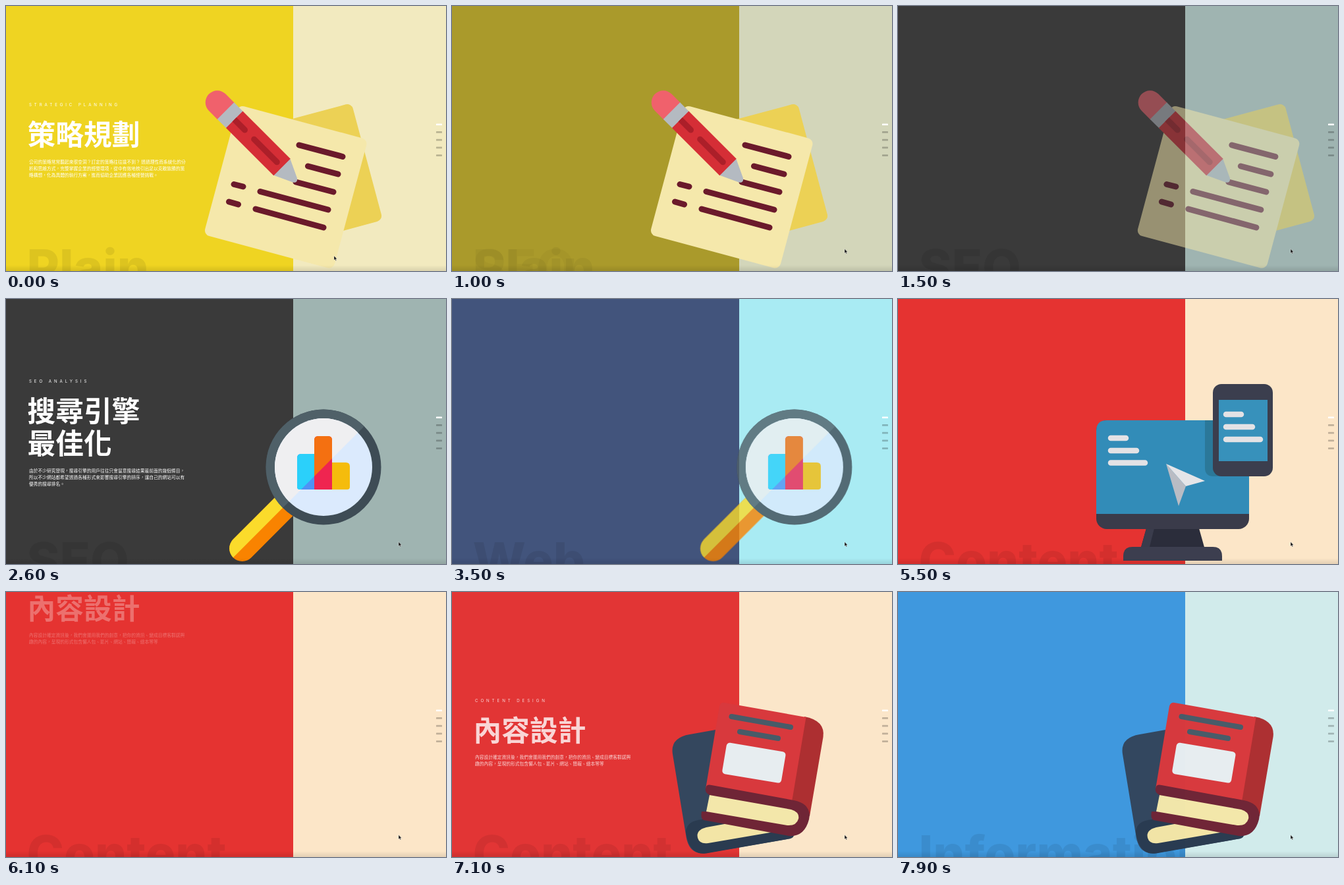
These frames come from a looping animation (668x402 px, 8 s). An HTML page:

```html
<!DOCTYPE html>
<html lang="zh-Hant">
<head>
<meta charset="utf-8">
<title>Service slides</title>
<style>
html, body { margin: 0; width: 100%; height: 100%; overflow: hidden; }
svg { display: block; width: 100vw; height: 100vh; }
.word { font: 800 76px Inter, "Open Sans", sans-serif; fill: #000; fill-opacity: .075; }
.copy { fill: #fff; font-family: "Noto Sans CJK TC", "Noto Sans CJK", "Noto Sans CJK SC", "Noto Sans CJK JP", sans-serif; }
.tag { font: 400 6.2px Inter, sans-serif; letter-spacing: 3.9px; }
.title { font-size: 42.7px; font-weight: 700; }
.body { font-size: 6.75px; }
.round { stroke-linecap: round; fill: none; }
</style>
</head>
<body>
<svg viewBox="0 0 668 402" preserveAspectRatio="none">
  <defs>
    <linearGradient id="shade" x2="0" y2="1">
      <stop stop-opacity="0"/><stop offset="1" stop-opacity=".1"/>
    </linearGradient>
    <clipPath id="upper"><path d="M337 400V100H637Z"/></clipPath>
    <path id="low" d="M468 235H448Q442 235 442 241V285Q442 289 446 289H468Z"/>
    <path id="tall" d="M468 289V214Q468 208 474 208H489Q495 208 495 214V289Z"/>
  </defs>
  <rect id="left" width="668" height="402"/>
  <g id="words"></g>
  <rect id="right" x="436" width="232" height="402"/>
  <g id="copies"></g>

  <g id="arts">
    <!-- notes and pencil -->
    <g>
      <rect x="-150" width="150" height="184" rx="9" fill="#ecd155" transform="translate(524.5 147) rotate(-15)"/>
      <rect width="203.7" height="203.7" rx="9" fill="#f5e8ab" transform="translate(352.7 150) rotate(15)"/>
      <path class="round" stroke="#6b1a2b" stroke-width="9" d="M445 211L511 228.5M458.5 243L504 255M440 267L497 282M386 281.5L489 309M379 308L482 336M346 270.5L360 274M338.5 297L352.5 301"/>
      <g transform="translate(333.5 159) rotate(45)">
        <path fill="#f0616c" d="M1 -18H-18A18 18 0 0 0 -18 18H1Z"/>
        <path fill="#b4bac1" d="M0 -18H20V18H0ZM120 -18L149 -4.5Q155 0 149 4.5L120 18Z"/>
        <path fill="#d52e36" d="M18.7 -18H121V18H18.7Z"/>
        <path fill="#ac1f29" d="M18.7 -4.5H41A4.5 4.5 0 0 1 41 4.5H18.7Z"/>
        <path class="round" stroke="#ac1f29" stroke-width="9" d="M61 0H110"/>
      </g>
    </g>
    <!-- magnifier -->
    <g>
      <g transform="translate(482 255) rotate(135)">
        <path fill="#f98300" d="M80 -19.5H174.5A19.5 19.5 0 0 1 174.5 19.5H80Z"/>
        <path fill="#fbdb2b" d="M80 0H194A19.5 19.5 0 0 1 174.5 19.5H80Z"/>
      </g>
      <circle cx="482" cy="255" r="87.5" fill="#3e4c55"/>
      <circle cx="482" cy="255" r="87.5" fill="#4f6068" clip-path="url(#upper)"/>
      <circle cx="482" cy="255" r="74" fill="#dbeafd"/>
      <circle cx="482" cy="255" r="74" fill="#efeff1" clip-path="url(#upper)"/>
      <path fill="#f5bc0c" d="M494 248H516Q522 248 522 254V285Q522 289 518 289H494Z"/>
      <use href="#low" fill="#4f92f5"/>
      <use href="#low" fill="#2bd0fa" clip-path="url(#upper)"/>
      <use href="#tall" fill="#ef2550"/>
      <use href="#tall" fill="#f47011" clip-path="url(#upper)"/>
    </g>
    <!-- screens -->
    <g>
      <g transform="translate(5 0)">
        <path fill="#2b2d3b" d="M372 348H452L461 380H363Z"/>
        <path fill="#3a3c4c" d="M372 348L363 380H376L384 348Z"/>
        <path fill="#3c3e4f" d="M337 397V390Q337 376 351 376H473Q487 376 487 390V397Z"/>
        <rect x="296" y="184" width="232" height="165" rx="16" fill="#3a3b4a"/>
        <path fill="#328cb8" d="M296 326V200Q296 184 312 184H512Q528 184 528 200V326Z"/>
        <path fill="#2b7899" d="M461 184H528V269H474Q461 269 461 256Z"/>
        <rect x="473" y="129" width="91" height="140" rx="13" fill="#3b3e4e"/>
        <path fill="#3791bb" d="M482 153H556V246H482Z"/>
        <path class="round" stroke="#e3e2e5" stroke-width="8.5" d="M318 211H341M318 230H357M318 248.5H370M493 175H516M493 194H533M493 213H545"/>
        <path fill="#b9bcc4" d="M402 250L432 284L421 314Z"/>
        <path fill="#e5e5e8" d="M402 250L461 276L432 284Z"/>
      </g>
    </g>
    <!-- books -->
    <g>
      <g transform="translate(-6 0)">
        <path fill="#34475e" d="M412 208L367 216Q337 221 341 246L361 368Q365 400 392 396L520 374L480 300Z"/>
        <path fill="#2a3b50" d="M361 364Q362 347 386 345L500 326L525 366Q526 372 520 374L392 396.5Q366 400 361 364Z"/>
        <path fill="#f3e5a6" d="M392 357Q376 361 379 373Q382 383 395 381L500 363L480 341Z"/>
        <path fill="#ad2f31" d="M541 189Q573 195 569.5 220L549 340L515 325Z"/>
        <path fill="#d8393d" d="M420 168L543.5 190L522 318L391 299L412 173Q414 167 420 168Z"/>
        <path fill="#6f2536" d="M391 298Q392 291 400 293L525 316Q547 320 549 338L548 345Q541 372 517 370L388 346Q383 344 385 333L393 333L397 308L394 306Q390 303 391 298Z"/>
        <path fill="#f3e7aa" d="M397 308L521 330Q534 334 532 344Q529 355 515 354L392 333Z"/>
        <path class="round" stroke="#485b68" stroke-width="8" d="M430.5 189L520 205M443 212L501 222"/>
        <rect width="91" height="48" rx="5" fill="#e7edf0" transform="translate(423.5 228) rotate(9.5)"/>
      </g>
    </g>
  </g>

  <g id="nav"></g>
  <rect y="393" width="668" height="9" fill="url(#shade)"/>
  <path id="mouse" d="M0 0V6.5L1.5 5.2L2.6 7.6L3.6 7.1L2.6 4.8H4.6Z" fill="#111" stroke="#fff" stroke-width=".4"/>
</svg>
<script>
const LOOP = 8000;
const $ = id => document.getElementById(id);

// Times in ms: copyIn, artIn = entrances; leave = copy and colours go; artOut = art goes.
const slides = [
  { word: "Plain", left: [239, 212, 34], right: [242, 234, 191],
    tag: "STRATEGIC PLANNING", tagY: 151.5, titleY: 211, bodyY: 238.5, title: ["策略規劃"],
    body: ["公司的策略常常聽起來很空洞？訂定的策略往往達不到？ 透過理性而系統化的分",
      "析和思維方式，完整掌握企業的經營環境，從中有效地梳引出足以克敵致勝的策",
      "略構想，化為具體的執行方案，進而協助企業因應各種經營挑戰。"],
    copyIn: -1000, artIn: -1000, leave: 750, artOut: 1336 },
  { word: "SEO", left: [58, 58, 58], right: [159, 180, 177],
    tag: "SEO ANALYSIS", tagY: 127, titleY: 186, bodyY: 263, title: ["搜尋引擎", "最佳化"],
    body: ["由於不少研究發現，搜尋引擎的用戶往往只會留意搜尋結果最前面的幾個條目，",
      "所以不少網站都希望透過各種形式來影響搜尋引擎的排序，讓自己的網站可以有",
      "優秀的搜尋排名。"],
    copyIn: 1706, artIn: 2140, leave: 2650, artOut: 3400 },
  { word: "Web", left: [66, 84, 124], right: [169, 235, 243],
    tag: "WEB DESIGN", tagY: 156.5, titleY: 216, bodyY: 243, title: ["網頁設計"],
    body: ["形象網站一般稱呼為「官網」，主要是用來展示您公司行號有什麼樣的服務、費",
      "用、並提供聯絡表單或聯絡方式、位置或是品牌故事介紹等。"],
    copyIn: 3813, artIn: 4260, leave: 4850, artOut: 5660 },
  { word: "Content", left: [229, 51, 49], right: [252, 230, 200],
    tag: "CONTENT DESIGN", tagY: 156.5, titleY: 216, bodyY: 243, title: ["內容設計"],
    body: ["內容設計確定資訊後，我們會運用我們的創意，把你的資訊、變成目標客群感興",
      "趣的內容，呈現的形式包含懶人包、影片、網站、簡報、繪本等等"],
    copyIn: 6026.5, artIn: 6460, leave: 7050, artOut: 7885 },
  { word: "Information", left: [63, 152, 222], right: [209, 235, 235] }
];

function add(parent, name, attrs, text) {
  const el = document.createElementNS("http://www.w3.org/2000/svg", name);
  for (const key in attrs) el.setAttribute(key, attrs[key]);
  if (text) el.textContent = text;
  return parent.appendChild(el);
}

slides.forEach((s, i) => {
  s.wordEl = add($("words"), "text", { class: "word", x: 31.5, y: 424 }, s.word);
  if (!s.tag) return;
  s.art = $("arts").children[i];
  s.copy = add($("copies"), "g", { class: "copy" });
  add(s.copy, "text", { class: "tag", x: 35, y: s.tagY }, s.tag);
  s.title.forEach((line, n) => add(s.copy, "text", { class: "title", x: 32.6, y: s.titleY + 49 * n }, line));
  s.body.forEach((line, n) => add(s.copy, "text", { class: "body", x: 35, y: s.bodyY + 10 * n }, line));
});
for (let i = 0; i < 5; i++) {
  add($("nav"), "rect", { x: 653, y: 178.4 + 11.7 * i, width: 9, height: 2.7, rx: .6,
    fill: i ? "#000" : "#fff", "fill-opacity": i ? .23 : 1 });
}

const part = (t, start, length) => Math.min(1, Math.max(0, (t - start) / length));
const smooth = p => p * p * (3 - 2 * p);
const mix = (a, b, p) => `rgb(${a.map((v, i) => Math.round(v + (b[i] - v) * p))})`;

function place(el, x, y, opacity) {
  el.setAttribute("transform", `translate(${x} ${y})`);
  el.setAttribute("opacity", opacity);
}

function draw(t) {
  let now = 0;
  while (now < 3 && t >= slides[now + 1].leave) now++;
  const from = slides[now], to = slides[now + 1];
  const fade = smooth(part(t, from.leave, 600));
  $("left").setAttribute("fill", mix(from.left, to.left, fade));
  $("right").setAttribute("fill", mix(from.right, to.right, fade));

  for (const s of slides) {
    s.wordEl.setAttribute("opacity", s === from ? 1 - fade : s === to ? fade : 0);
    if (!s.copy) continue;
    const copyIn = part(t, s.copyIn, 250), copyOut = part(t, s.leave, 250);
    place(s.copy, 0, -297 * (1 - copyIn) ** 1.5 + 250 * copyOut ** 2, copyIn * (1 - copyOut));
    const artIn = part(t, s.artIn, 440), artOut = part(t, s.artOut, 240);
    place(s.art, -250 * (1 - artIn) ** 5 + 90 * artOut, 0,
      (1 - (1 - artIn) ** 3) * (1 - artOut ** 1.87));
  }

  const move = smooth(part(t, 40, 460));
  place($("mouse"), 498 + 98 * move, 379 - 10.5 * move, 1);
}

const begin = performance.now();
function tick() {
  draw((performance.now() - begin) % LOOP);
  requestAnimationFrame(tick);
}
tick();
</script>
</body>
</html>
```
